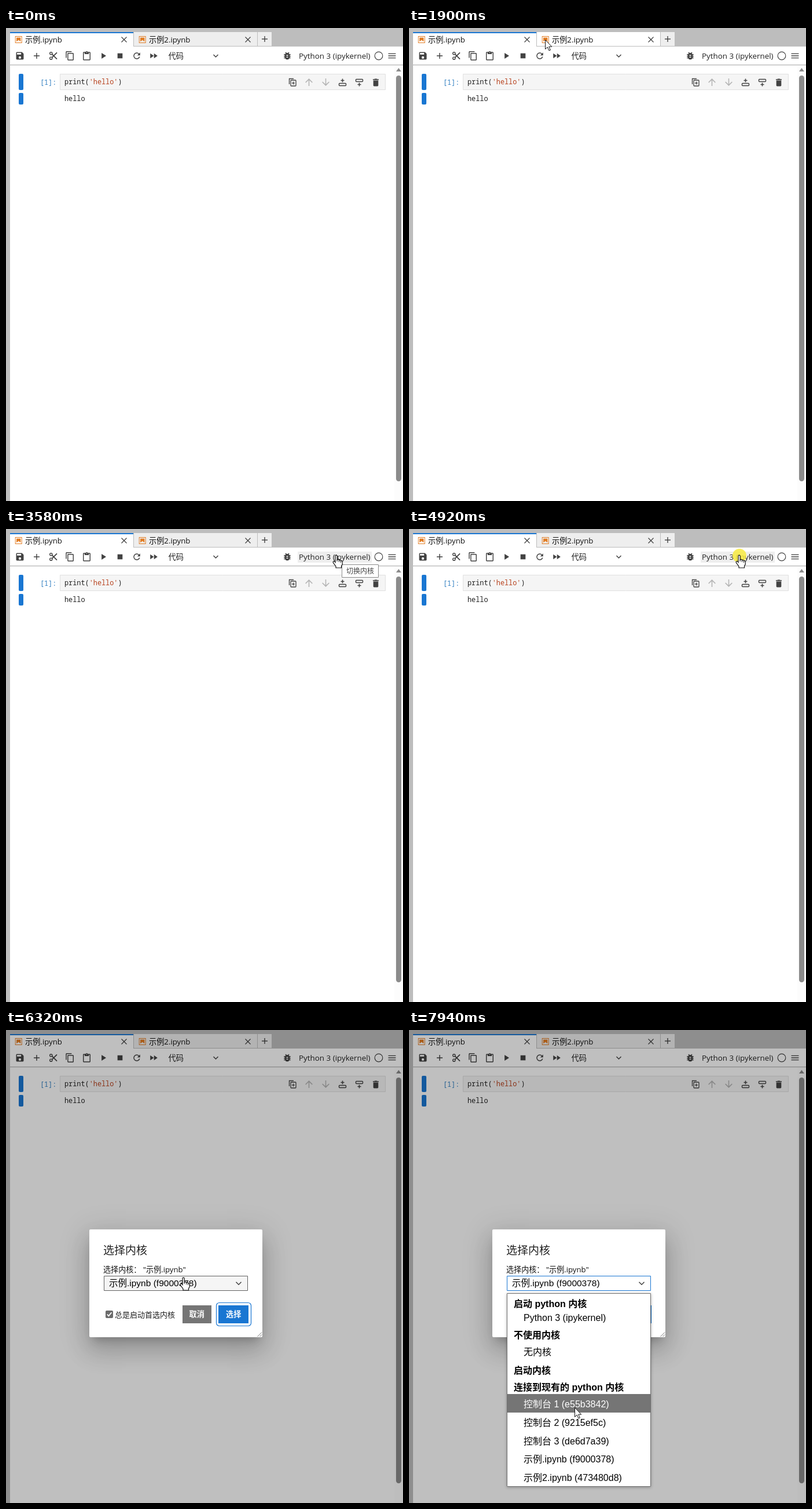
Write an HTML page with a canvas that moves like this. It is 686 px wide and 816 px high and loops after 8 s.

```html
<!DOCTYPE html>
<html lang="zh-CN">
<head>
<meta charset="utf-8">
<title>Notebook kernel picker</title>
<style>
html, body { margin: 0; width: 100%; height: 100%; overflow: hidden; background: #bdbdbd; }
canvas { display: block; width: 686px; height: 816px; }
</style>
</head>
<body>
<canvas id="stage" width="686" height="816"></canvas>
<script>
const ctx = document.getElementById('stage').getContext('2d');
const LOOP = 8000;
const BLUE = '#1976d2', GREY = '#bdbdbd', INK = '#424242', TEXT = '#212121';
const CJK = '"Noto Sans CJK SC", "Noto Sans CJK JP", sans-serif';
const UI = '"Open Sans", ' + CJK;
const ARIAL = '"Liberation Sans", ' + CJK;
const MONO = '"Noto Sans Mono", "DejaVu Sans Mono", monospace';

const icons = {
  save: 'M17 3H5c-1.1 0-2 .9-2 2v14c0 1.1.9 2 2 2h14c1.1 0 2-.9 2-2V7zm-5 16a3 3 0 110-6 3 3 0 010 6zm3-10H5V5h10z',
  add: 'M19 13h-6v6h-2v-6H5v-2h6V5h2v6h6z',
  copy: 'M16 1H4c-1.1 0-2 .9-2 2v14h2V3h12zm3 4H8c-1.1 0-2 .9-2 2v14c0 1.1.9 2 2 2h11c1.1 0 2-.9 2-2V7c0-1.1-.9-2-2-2zm0 16H8V7h11z',
  paste: 'M19 2h-4.2a3 3 0 00-5.6 0H5c-1.1 0-2 .9-2 2v16c0 1.1.9 2 2 2h14c1.1 0 2-.9 2-2V4c0-1.1-.9-2-2-2zm-7 0a1 1 0 110 2 1 1 0 010-2zm7 18H5V4h2v3h10V4h2z',
  run: 'M8 5v14l11-7z',
  stop: 'M6 6h12v12H6z',
  restart: 'M17.6 6.4A8 8 0 1019.7 14h-2.1a6 6 0 11-1.4-6.2L13 11h7V4z',
  forward: 'M4 18l8.5-6L4 6zm9-12v12l8.5-6z',
  bug: 'M20 8h-2.8a6 6 0 00-1.8-2L17 4.4 15.6 3l-2.2 2.2a6 6 0 00-2.8 0L8.4 3 7 4.4 8.6 6a6 6 0 00-1.8 2H4v2h2.1l-.1 2H4v2h2l.1 2H4v2h2.8a6 6 0 0010.4 0H20v-2h-2.1l.1-2h2v-2h-2l-.1-2H20zm-6 8h-4v-2h4zm0-4h-4v-2h4z',
  menu: 'M3 18h18v-2H3zm0-5h18v-2H3zm0-7v2h18V6z',
  up: 'M4 12l1.4 1.4L11 7.8V20h2V7.8l5.6 5.6L20 12l-8-8z',
  trash: 'M6 19c0 1.1.9 2 2 2h8c1.1 0 2-.9 2-2V7H6zM19 4h-3.5l-1-1h-5l-1 1H5v2h14z',
  book: 'M19.7 4.3v15.4H4.3V4.3zM21.2 2.8H2.8v18.4h18.4zM17.5 17.5l-5.4-4.3-5.6 4.3v-11h11z'
};
for (const k in icons) icons[k] = new Path2D(icons[k]);
const arrow = new Path2D('M.5.5V16.5L4.2 13 7 19 9.4 18 6.7 12.2H11.7Z');
const hand = new Path2D('M-2 1.7Q-2 .2-.4.2 1.2.2 1.2 1.7V8Q4 6.9 4.5 8.8 7 8 7.5 9.7 10 9.2 10.2 11.2V16L8.5 19V22H-1V19.5L-5.3 13.6Q-6.5 11.6-5 10.8-3.5 10.3-2 12.5Z');

function rect(x, y, w, h, fill, r = 0) {
  ctx.fillStyle = fill;
  ctx.beginPath();
  ctx.roundRect(x, y, w, h, r);
  ctx.fill();
}
function frame(x, y, w, h, color, r = 0, width = 1) {
  ctx.strokeStyle = color;
  ctx.lineWidth = width;
  ctx.beginPath();
  ctx.roundRect(x + .5, y + .5, w - 1, h - 1, r);
  ctx.stroke();
}
function line(color, width, ...pts) {
  ctx.strokeStyle = color;
  ctx.lineWidth = width;
  ctx.beginPath();
  for (let i = 0; i < pts.length; i += 2) ctx.lineTo(pts[i], pts[i + 1]);
  ctx.stroke();
}
function disc(x, y, r, fill) {
  ctx.fillStyle = fill;
  ctx.beginPath();
  ctx.arc(x, y, r, 0, 7);
  ctx.fill();
}
function ring(x, y, r, width) {
  ctx.strokeStyle = INK;
  ctx.lineWidth = width;
  ctx.beginPath();
  ctx.arc(x, y, r, 0, 7);
  ctx.stroke();
}
function text(s, x, y, size, family = UI, color = TEXT, weight = 400) {
  ctx.font = `${weight} ${size}px ${family}`;
  ctx.fillStyle = color;
  ctx.fillText(s, x, y);
}
function icon(name, x, y, scale = .72, color = INK, flip = 1) {
  ctx.save();
  ctx.translate(x, y);
  ctx.scale(scale, scale * flip);
  ctx.translate(-12, -12);
  ctx.fillStyle = color;
  ctx.fill(icons[name], 'evenodd');
  ctx.restore();
}
function shadow(x, y, w, h, dy, blur, spread, alpha) {
  ctx.save();
  ctx.shadowColor = `rgba(0,0,0,${alpha})`;
  ctx.shadowBlur = blur;
  ctx.shadowOffsetX = 2000;
  ctx.shadowOffsetY = dy;
  ctx.fillStyle = '#000';
  ctx.fillRect(x - 2000 - spread, y - spread, w + 2 * spread, h + 2 * spread);
  ctx.restore();
}
const chevron = (x, y, r) => line(INK, 1.5, x - r, y - r / 2, x, y + r / 2, x + r, y - r / 2);
function cross(x, y) {
  line(INK, 1.3, x - 4.5, y - 4.5, x + 4.5, y + 4.5);
  line(INK, 1.3, x + 4.5, y - 4.5, x - 4.5, y + 4.5);
}
function plus(x, y, r, width) {
  line(INK, width, x - r, y, x + r, y);
  line(INK, width, x, y - r, x, y + r);
}

// Pointer moves: start, end, number of steps, waypoints [share, x, y]
const moves = [
  [660, 1410, 12, [[0, 632, 798], [.3, 535, 580], [.64, 403, 290], [.818, 368, 178], [1, 334, 110]]],
  [1480, 1900, 7, [[0, 318, 94], [.33, 250, 48], [.67, 192, 25], [1, 235, 20]]],
  [2430, 3190, 11, [[0, 262, 20], [.3, 336, 26], [.5, 420, 62], [.7, 500, 93], [.9, 558, 64], [1, 568, 51]]],
  [3250, 3320, 2, [[0, 570, 47], [1, 571, 45]]],
  [5640, 5910, 5, [[0, 545, 80], [.5, 415, 275], [1, 318, 409]]],
  [6110, 6520, 6, [[0, 315, 415], [.4, 307, 427], [.6, 305, 429], [1, 305, 429]]],
  [7050, 7740, 11, [[0, 305, 434], [.3, 303, 500], [.6, 296, 582], [.85, 288, 640], [1, 286, 652]]],
  [7940, 7941, 2, [[0, 286, 651], [1, 286, 651]]]
];
function pointer(t) {
  const m = moves.filter(v => t >= v[0]).pop();
  if (!m) return null;
  const [start, end, n, pts] = m;
  const step = Math.floor((t - start + 6) / (end - start) * (n - 1));
  const p = Math.min(1, step / (n - 1));
  const i = Math.max(1, pts.findIndex(q => q[0] >= p - 1e-6));
  const [a, b] = [pts[i - 1], pts[i]];
  const k = (p - a[0]) / (b[0] - a[0]);
  return { x: Math.round(a[1] + (b[1] - a[1]) * k), y: Math.round(a[2] + (b[2] - a[2]) * k) };
}
const inside = (p, x, y, w, h) => p && p.x >= x && p.x < x + w && p.y >= y && p.y < y + h;

function tab(x, label, fill) {
  rect(x, 7, 213, 25, fill);
  icon('book', x + 14.7, 20, .65, '#e27d24');
  text(label, x + 26, 24.6, 13.2, UI, '#111');
  cross(x + 197, 20);
}

function notebook(t, p) {
  rect(0, 0, 686, 816, GREY);
  rect(7, 32, 679, 784, '#fff');
  tab(7, '示例.ipynb', '#fff');
  rect(7, 7, 213, 2, BLUE);
  tab(221, '示例2.ipynb', t < 5050 && inside(p, 221, 7, 213, 24) ? '#fff' : '#eee');
  rect(220, 31, 466, 1, GREY);
  rect(435, 7, 24, 24, '#eee');
  plus(447, 19, 5, 1.4);

  // Toolbar
  rect(7, 63, 679, 1, GREY);
  rect(7, 64, 679, 1, '#e4e4e4');
  icon('save', 24, 48);
  icon('add', 53, 48);
  for (const s of [-1, 1]) {
    ring(77.8, 48 + s * 4.2, 2.1, 1.4);
    line(INK, 1.8, 79.5, 48 + s * 2.8, 88, 48 - s * 5.6);
  }
  icon('copy', 110.5, 48);
  icon('paste', 139.5, 48.5);
  icon('run', 168, 48);
  icon('stop', 197, 48);
  icon('restart', 226, 48);
  icon('forward', 255, 48);
  text('代码', 280.5, 52.8, 13.2);
  chevron(362.5, 48, 4);
  icon('bug', 486, 48);
  if (t >= 3100 && t < 5050 && inside(p, 504, 39, 128, 20)) rect(504, 39, 128, 19, '#eee');
  text('Python 3 (ipykernel)', 506, 52.7, 13.4);
  ring(644, 48, 6.8, 1.2);
  icon('menu', 667, 48);

  // Cell and its output
  rect(22, 79, 8, 28, BLUE, 2);
  rect(22, 112, 8, 20, BLUE, 2);
  rect(93, 79, 563, 28, '#f5f5f5');
  frame(93, 79, 563, 28, '#e0e0e0');
  text('[1]:', 59, 97.5, 11.85, MONO, '#307fc1');
  text('print(', 101, 96.7, 11.85, MONO);
  text("'hello'", 143.7, 96.7, 11.85, MONO, '#b8431f');
  text(')', 193.4, 96.7, 11.85, MONO);
  text('hello', 101, 125.5, 11.85, MONO);

  line(INK, 1.3, 489.5, 97, 489.5, 87.5, 497, 87.5);
  frame(491.5, 89.5, 10, 11, INK, 1, 1.3);
  plus(496.5, 95, 2.5, 1.2);
  icon('up', 523.5, 93.5, .8, '#b5b5b5');
  icon('up', 552.5, 93.5, .8, '#b5b5b5', -1);
  frame(575, 95, 13, 5, INK, 1, 1.4);
  plus(581.5, 90.5, 3, 1.5);
  frame(604, 88, 13, 5, INK, 1, 1.4);
  plus(610.5, 97.5, 3, 1.5);
  icon('trash', 639, 94);

  // Scrollbar
  rect(671, 65, 15, 751, '#fcfcfc');
  ctx.fillStyle = '#8b8b8b';
  ctx.beginPath();
  ctx.moveTo(678.5, 69);
  ctx.lineTo(683, 75);
  ctx.lineTo(674, 75);
  ctx.fill();
  rect(674, 82, 9, 700, '#8b8b8b', 4.5);
}

function dialog(focused) {
  rect(0, 0, 686, 816, 'rgba(0,0,0,.25)');
  const box = [144, 344, 299, 186];
  shadow(...box, 11, 15, -7, .2);
  shadow(...box, 24, 38, 3, .14);
  shadow(...box, 9, 46, 8, .12);
  rect(...box, '#fff', 2);
  text('选择内核', 168, 387, 19);
  text('选择内核： "示例.ipynb"', 168, 417.7, 13.1, UI, '#111');

  rect(169, 424, 249, 26, focused ? '#fff' : '#f5f5f5');
  frame(169, 424, 249, 26, focused ? BLUE : '#616161');
  text('示例.ipynb (f9000378)', 178, 442, 15.5, ARIAL, '#000');
  chevron(402, 437, 4.5);

  rect(172, 484, 13, 13, '#6b6b6b', 2);
  line('#fff', 1.8, 174.8, 490.5, 177.4, 493.3, 182.4, 487.2);
  text('总是启动首选内核', 188, 496, 13);
  rect(305, 475, 50, 31, '#757575');
  text('取消', 316.5, 495, 13.2, UI, '#fff', 700);
  rect(367, 475, 52, 31, BLUE);
  text('选择', 380, 495, 13.2, UI, '#fff', 700);
  if (!focused) frame(363, 470, 61, 41, BLUE, 5, 1.2);
  line('#777', 1, 434.5, 529, 442, 521.5);
  line('#777', 1, 438.5, 529, 442, 525.5);
}

// Label, text centre; rows with a third value are options: top of the row
const rows = [
  ['启动 python 内核', 472], ['Python 3 (ipykernel)', 496, 484],
  ['不使用内核', 526.5], ['无内核', 555.5, 540],
  ['启动内核', 587], ['连接到现有的 python 内核', 616],
  ['控制台 1 (e55b3842)', 645, 628], ['控制台 2 (9215ef5c)', 677, 660],
  ['控制台 3 (de6d7a39)', 709, 692], ['示例.ipynb (f9000378)', 740.5, 723],
  ['示例2.ipynb (473480d8)', 772, 755]
];
function popup(p) {
  shadow(169, 454, 249, 334, 1, 5, 0, .3);
  rect(169, 454, 249, 334, '#fff');
  const active = rows.filter(r => r[2] && p.y >= r[2]).pop() || rows[9];
  for (const row of rows) {
    const [label, cy, top] = row;
    const on = row === active;
    if (on) rect(170, top, 247, top === 484 ? 24 : 32, '#757575');
    text(label, top ? 198 : 181, cy + 5.6, 16, ARIAL, on ? '#fff' : '#000', top ? 400 : 700);
  }
  frame(169, 454, 249, 334, '#6e6e6e');
}

function draw(t) {
  const p = pointer(t);
  const modal = t >= 5050, focused = t >= 6356, open = t >= 6438;
  notebook(t, p);
  if (t >= 3580 && t < 4920) {
    rect(580, 61, 64, 23, '#fff');
    frame(580, 61, 64, 23, '#8a8a8a');
    text('切换内核', 588, 77, 12, UI, '#444');
  }
  if (modal) dialog(focused);
  if (open) popup(p);
  if (!p) return;
  const click = (t >= 4920 && t < 5050) || (focused && !open);
  if (click) disc(p.x, p.y + 1, 12, 'rgba(247,234,64,.85)');
  const link = modal ? inside(p, 169, 424, 249, 26) : inside(p, 504, 39, 128, 20);
  ctx.save();
  ctx.translate(p.x, p.y);
  ctx.fillStyle = '#fff';
  ctx.strokeStyle = '#111';
  ctx.lineWidth = link ? 1.2 : 1;
  ctx.fill(link ? hand : arrow);
  ctx.stroke(link ? hand : arrow);
  if (link) for (const [x, y] of [[1.2, 8], [4.5, 9], [7.5, 10]]) line('#111', 1, x, y, x, y + 3);
  ctx.restore();
}

const begin = performance.now();
function tick() {
  draw((performance.now() - begin) % LOOP);
  requestAnimationFrame(tick);
}
tick();
</script>
</body>
</html>
```
